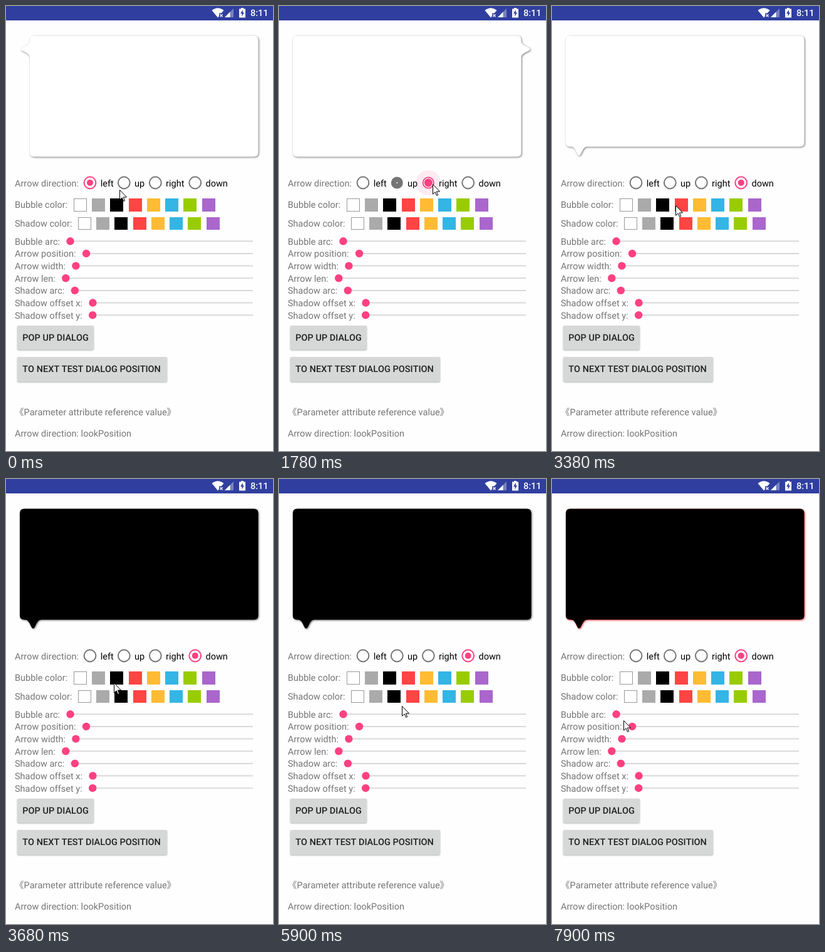
Write an HTML page that moves like this. It is 426 px wide and 710 px high and loops after 7990 ms.

```html
<!DOCTYPE html>
<html lang="en">
<head>
<meta charset="utf-8">
<title>Bubble settings</title>
<style>
  html, body { margin: 0; width: 100%; height: 100%; overflow: hidden; background: #fefefe; }
  svg { display: block; }
  text {
    font: 14.5px Roboto, "Noto Sans CJK SC", "Noto Sans CJK JP", sans-serif;
    font-kerning: none; text-rendering: geometricPrecision; fill: #757575;
  }
  .option { fill: #000; }
  .button { font-weight: 500; fill: #212121; }
  .clock { font-weight: 500; fill: #fff; }
  .plate { fill: #d6d7d7; filter: drop-shadow(0 1px 1px rgba(0, 0, 0, .3)); }
  .track { stroke: #d9d9d9; stroke-width: 2; }
  .thumb, .ripple { fill: #ff4081; }
</style>
</head>
<body>
<svg width="426" height="710" viewBox="0 0 426 710">
  <rect width="426" height="23" fill="#303f9f"/>
  <g fill="#fff">
    <path d="M338 18.5 328.5 7Q338 -.5 347.5 7L343.5 11.5H340V16Z"/>
    <path d="M341.5 13.2 345.5 17.2M345.5 13.2 341.5 17.2" stroke="#fff" stroke-width="1.3"/>
    <path d="M349 18H363V4Z" opacity=".35"/>
    <path d="M349 18H357.5V9.5Z"/>
    <path d="M375 3H379V4.5H382V18.5H372V4.5H375Z"/>
    <path d="M377.8 6 374 12H376.4V16.5L380 10.5H377.8Z" fill="#303f9f"/>
  </g>
  <g id="shadow"><path id="bubble"/></g>
  <g id="panel"></g>
  <path id="cursor" d="M.5 .5V16.2L4.1 12.8 6.6 18.4 8.7 17.5 6.3 12H11.5Z"
    fill="#fff" stroke="#000" stroke-linejoin="round"/>
</svg>
<script>
const LOOP = 7990;
const $ = id => document.getElementById(id);
const panel = $('panel');

function set(el, attrs) {
  for (const k in attrs) el.setAttribute(k, attrs[k]);
  return el;
}
function add(tag, attrs, content) {
  const el = set(document.createElementNS('http://www.w3.org/2000/svg', tag), attrs);
  if (content) el.textContent = content;
  return panel.appendChild(el);
}
const label = (x, y, content, cls = '') => add('text', { x, y, class: cls }, content);

// Static controls
label(390, 16, '8:11', 'clock');
label(14, 288, 'Arrow direction:');
const sides = { left: 134, up: 188.3, right: 238.3, down: 301.7 };
const radios = Object.entries(sides).map(([side, cx]) => {
  label(cx + 16.8, 288, side, 'option');
  return {
    ripple: add('circle', { cx, cy: 282, class: 'ripple' }),
    ring: add('circle', { cx, cy: 282, fill: 'none' }),
    dot: add('circle', { cx, cy: 282 })
  };
});

const palette = ['#fff', '#aaa', '#000', '#f44', '#fb3', '#33b5e5', '#9c0', '#a6c'];
function swatches(name, x, y, height) {
  label(14, y + 15, name);
  palette.forEach((fill, i) => {
    const left = Math.floor(x + .2 + i * 29.28), inset = i ? 0 : .5;
    add('rect', {
      x: left + inset, y: y + inset, width: 21 - 2 * inset, height: height - 2 * inset,
      fill, stroke: i ? 'none' : '#999'
    });
  });
}
swatches('Bubble color:', 108, 307, 21);
swatches('Shadow color:', 115, 337, 20);

// Each slider starts where its label ends
const sliders = ['Bubble arc', 'Arrow position', 'Arrow width', 'Arrow len',
  'Shadow arc', 'Shadow offset x', 'Shadow offset y'];
sliders.forEach((name, i) => {
  const y = 375.3 + i * 19.65;
  const text = label(14, Math.round(y + 5.5), name + ':');
  const x = 14 + text.getComputedTextLength() + 16.5;
  add('line', { x1: x, x2: 394, y1: y, y2: y, class: 'track' });
  add('circle', { cx: x, cy: y, r: 6.2, class: 'thumb' });
});

function button(y, width, height, name) {
  add('rect', { x: 18, y, width, height, rx: 2, class: 'plate' });
  label(26.3, y + 24, name, 'button');
}
button(510, 122, 38.5, 'POP UP DIALOG');
button(560, 239, 39.5, 'TO NEXT TEST DIALOG POSITION');
label(14, 653, '《Parameter attribute reference value》');
label(14, 687, 'Arrow direction: lookPosition');

// Bubble outline, built with the arrow on the v = 0 edge and mapped to each side
function bubblePath(side) {
  const x0 = 22, y0 = 47.6, x1 = 402.5, y1 = 240.6, depth = 14;
  const upright = side === 'up' || side === 'down';
  const [a, b] = upright ? [x1 - x0, y1 - y0 - 16] : [y1 - y0, x1 - x0 - 16];
  const map = {
    up: (u, v) => [x0 + u, y1 - b + v],
    down: (u, v) => [x0 + u, y0 + b - v],
    left: (u, v) => [x1 - b + v, y0 + u],
    right: (u, v) => [x0 + b - v, y0 + u]
  }[side];
  const p = (...n) => {
    let out = '';
    for (let i = 0; i < n.length; i += 2) out += map(n[i], n[i + 1]).join() + ' ';
    return out;
  };
  const r = 7, c = 21.3, tip = -depth;
  return `M${p(r, 0)}L${p(c - 13, 0)}C${p(c - 5, 0, c - 4, tip, c, tip)}` +
    `C${p(c + 4, tip, c + 5, 0, c + 13, 0)}L${p(a - r, 0)}Q${p(a, 0, a, r)}` +
    `L${p(a, b - r)}Q${p(a, b, a - r, b)}L${p(r, b)}Q${p(0, b, 0, b - r)}L${p(0, r)}Q${p(0, 0, r, 0)}Z`;
}
const bubbles = Object.keys(sides).map(bubblePath);

// Press time of each radio, in order
const pressed = [-LOOP, 460, 1540, 2850, Infinity];

// Cursor legs: start, end, x, y, sideways bow
const legs = [
  [90, 170, 186, 280], [700, 1170, 245, 284], [1900, 2450, 303, 289],
  [3000, 3470, 172, 325], [3680, 4020, 180, 345], [4450, 5270, 159, 341, 6],
  [5490, 5900, 196, 362], [5900, 6250, 212, 347, -3], [6600, 7300, 94, 583], [7360, 7900, 114, 385, -.28]
];

const clamp = v => Math.max(0, Math.min(1, v));

function cursorAt(t) {
  let x = 181, y = 292.5;
  for (const [start, end, tx, ty, bow = 0] of legs) {
    if (t < start) break;
    const k = clamp((t - start) / (end - start));
    const dx = tx - x, dy = ty - y, arc = 2 * k * (1 - k) * bow;
    x += dx * k + dy * arc;
    y += dy * k - dx * arc;
  }
  return [x, y];
}

// The ring fills inward while squeezing, then opens around the new dot or hole
function drawRadio(radio, sinceOn, sinceOff) {
  const off = sinceOff > 0, on = sinceOn > 0 && !off;
  const since = off ? sinceOff : sinceOn;
  const fill = clamp(since / 200), open = clamp((since - 200) / 300);
  const scale = on || off ? 1 - .1 * (fill - open) : 1;
  const outer = 10.4 * scale, inner = 8.4 * scale;
  let hole = inner, dot = 0;
  if (on) {
    if (fill < 1) hole = inner * (1 - fill);
    else dot = 5 + (inner - 5) * (1 - open) ** 4;
  } else if (off) {
    if (fill < 1) dot = 5 + (inner - 5) * fill;
    else hole = inner * open;
  }
  const color = on ? '#ff4081' : '#757575';
  set(radio.ring, { r: (outer + hole) / 2, 'stroke-width': outer - hole, stroke: color });
  set(radio.dot, { r: dot, fill: color });
  set(radio.ripple, {
    r: 6 + 14 * clamp(sinceOn / 200),
    opacity: on ? .1 * (1 - clamp((sinceOn - 250) / 300)) : 0
  });
}

function draw(t) {
  radios.forEach((radio, i) => drawRadio(radio, t - pressed[i], t - pressed[i + 1]));
  const current = pressed.filter(p => p + 40 < t).length - 1;
  set($('bubble'), { d: bubbles[current], fill: t >= 3680 ? '#000' : '#fff' });
  const shade = t >= 6580 ? '#f44' : t >= 4440 ? '#666' : '#777';
  $('shadow').style.filter = `drop-shadow(1px 1px 1.4px ${shade})`;
  set($('cursor'), { transform: `translate(${cursorAt(t).map(Math.round)})` });
}

const begin = performance.now();
function tick() {
  draw((performance.now() - begin) % LOOP);
  requestAnimationFrame(tick);
}
tick();
</script>
</body>
</html>
```
